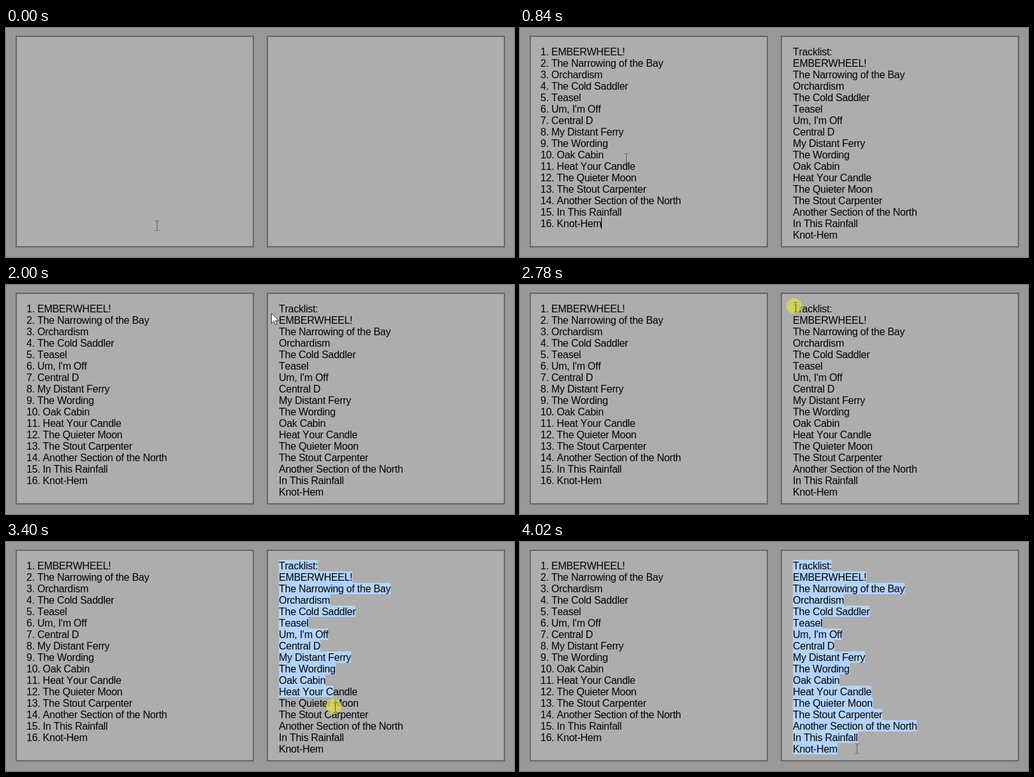
Write an HTML page that moves like this. It is 795 px wide and 360 px high and loops after 4500 ms.

```html
<!DOCTYPE html>
<html lang="en">
<head>
<meta charset="utf-8">
<title>Selecting a track list</title>
<style>
  html, body { margin: 0; width: 100%; height: 100%; overflow: hidden; background: #999; }
  #stage { position: relative; width: 795px; height: 360px; overflow: hidden; }
  #stage > *, .row, .mark { position: absolute; }
  .panel { top: 12px; width: 369px; height: 329px; border: 2px solid #666; background: #adadad; }
  .row {
    font: 16px/18px "Liberation Sans", Arial, sans-serif;
    letter-spacing: -.27px; font-kerning: none;
    white-space: pre; color: #000;
  }
  .mark { left: 427px; height: 18px; background: #b3d3fc; }
  #caret { width: 1px; height: 18px; background: #000; }
  svg { left: 0; top: 0; }
</style>
</head>
<body>
<div id="stage">
  <div class="panel" style="left:15px"></div>
  <div class="panel" style="left:408px"></div>
  <div id="lists"></div>
  <div id="caret"></div>
  <svg width="795" height="360">
    <circle id="click" r="12" fill="#dcdc46"/>
    <path id="beam" d="M-3 -7.5H-.5M.5 -7.5H3M-3 7.5H-.5M.5 7.5H3M0 -7V7" fill="none" stroke="#5a5a5a"/>
    <path id="arrow" d="M.5 .5V16.5L4.2 13L6.7 18.5L9.2 17.4L6.8 12H11.8Z" fill="#fff" stroke="#222" stroke-width=".9"/>
  </svg>
</div>
<script>
const LOOP = 4500, ROW = 18, TOP = 28, LEFT = 32, RIGHT = 427;
const titles = [
  "EMBERWHEEL!", "The Narrowing of the Bay", "Orchardism", "The Cold Saddler",
  "Teasel", "Um, I'm Off", "Central D", "My Distant Ferry", "The Wording",
  "Oak Cabin", "Heat Your Candle", "The Quieter Moon", "The Stout Carpenter",
  "Another Section of the North", "In This Rainfall", "Knot-Hem"
];

// bursts of pointer movement: first step, last step, number of steps
const bursts = [
  [70, 460, 6], [1300, 1770, 7], [1850, 2310, 7],
  [2560, 3010, 7], [3090, 3560, 7], [3630, 3700, 2]
];
const ticks = [0];
for (const [a, b, n] of bursts)
  for (let i = 0; i < n; i++)
    ticks.push(Math.floor((a + (b - a) * i / (n - 1)) / 10) * 10);

// pointer path: time, x, y
const path = [
  [0, 236, 311], [230, 206, 266], [460, 166, 205], [1220, 166, 205],
  [1530, 300, 132], [1770, 404, 72], [2000, 415, 44], [2310, 431, 42],
  [2480, 431, 42], [2640, 431, 33], [2710, 431, 33], [2780, 431, 35],
  [2860, 435, 41], [2930, 447, 54], [3010, 468, 88], [3090, 473, 100],
  [3320, 514, 240], [3400, 515, 260], [3480, 521, 302], [3560, 525, 312],
  [3630, 526, 321], [3700, 527, 325]
];

const $ = id => document.getElementById(id);
const lists = $("lists"), caret = $("caret"), click = $("click"), beam = $("beam"), arrow = $("arrow");
const show = (el, on) => { el.style.visibility = on ? "visible" : "hidden"; };
const move = (el, x, y) => el.setAttribute("transform", `translate(${x} ${y})`);

function add(cls, x, y, text = "") {
  const el = document.createElement("div");
  el.className = cls;
  el.style.left = x + "px";
  el.style.top = y + "px";
  el.textContent = text;
  lists.appendChild(el);
  return el;
}

function charEdges(el) {
  const range = document.createRange(), node = el.firstChild;
  const x0 = el.getBoundingClientRect().left;
  return [0, ...[...node.data].map((_, i) => {
    range.setStart(node, 0);
    range.setEnd(node, i + 1);
    return range.getBoundingClientRect().right - x0;
  })];
}

const left = titles.map((s, i) => add("row", LEFT, TOP + 1 + i * ROW, `${i + 1}. ${s}`));
const marks = [], edges = [];
["Tracklist:", ...titles].forEach((s, i) => {
  const y = TOP + i * ROW;
  marks.push(add("mark", RIGHT, y));
  edges.push(charEdges(add("row", RIGHT, y + 1, s)));
});
const endX = LEFT + Math.round(left[15].getBoundingClientRect().width);

function pointer(t) {
  const i = path.findIndex(p => p[0] > t);
  if (i < 0) return path[path.length - 1].slice(1);
  const [ta, xa, ya] = path[i - 1], [tb, xb, yb] = path[i];
  const k = (t - ta) / (tb - ta);
  return [Math.round(xa + (xb - xa) * k), Math.round(ya + (yb - ya) * k)];
}

// the selection trails the pointer by one step
function select(t, tick) {
  let last = -1, end = 0;
  if (t >= 2780) {
    const [x, y] = pointer(ticks[tick - 1]);
    last = Math.floor((y - TOP) / ROW);
    end = edges[last].reduce((a, b) => Math.abs(b + RIGHT - x) < Math.abs(a + RIGHT - x) ? b : a);
  }
  marks.forEach((m, i) => {
    const w = i < last ? edges[i][edges[i].length - 1] : i === last ? end : 0;
    m.style.width = Math.round(w) + "px";
  });
}

function draw(t) {
  let tick = 0;
  while (tick + 1 < ticks.length && ticks[tick + 1] <= t) tick++;
  const [x, y] = pointer(ticks[tick]);

  const pasted = t >= 840;
  show(lists, pasted);
  select(t, tick);

  show(caret, t >= 70 && t < 460 || pasted && t < 1530 || t >= 2080 && t < 2640);
  caret.style.left = (pasted ? endX : LEFT) + "px";
  caret.style.top = TOP + (pasted ? 15 * ROW : 0) + "px";

  const isArrow = x > 372 && x < 420;
  show(arrow, isArrow);
  show(beam, !isArrow);
  move(arrow, x, y);
  move(beam, x + .5, y);

  show(click, t >= 2640 && t < 4020);
  click.setAttribute("opacity", t < 3880 ? .78 : .4);
  move(click, x - 2, y - 2);
}

const start = performance.now();
function frame() {
  draw((performance.now() - start) % LOOP);
  requestAnimationFrame(frame);
}
frame();
</script>
</body>
</html>
```
